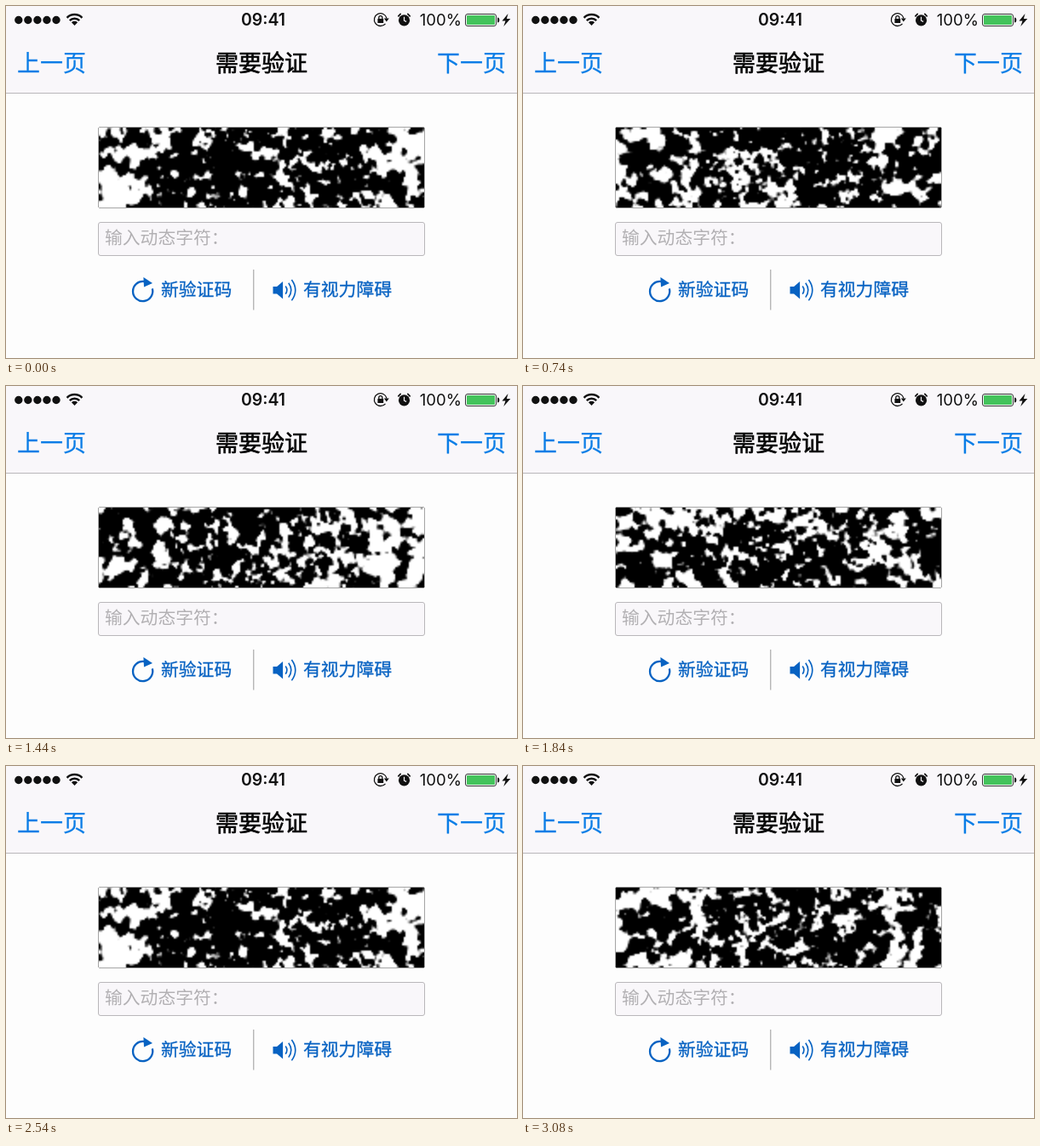
An HTML page with a canvas that plays this animation: 600x414 px, repeating every 3100 ms.

```html
<!DOCTYPE html>
<html lang="zh-CN">
<head>
<meta charset="utf-8">
<style>
  html, body { margin: 0; width: 100%; height: 100%; overflow: hidden; background: #fdfdfd; }
  svg, canvas { position: absolute; display: block; }
  svg { left: 0; top: 0; }
  canvas { left: 109px; top: 143px; width: 382px; height: 94px; }
  text { font-family: "Noto Sans CJK SC", "Noto Sans CJK", "Noto Sans", sans-serif; }
  .status { font-family: Inter, Roboto, sans-serif; fill: #111; }
  .nav { font-size: 27px; fill: #0a7de6; stroke: #0a7de6; stroke-width: 0.25; }
  .title { font-size: 27px; fill: #050505; stroke: #050505; stroke-width: 0.7; }
  .link { font-size: 20.8px; fill: #0762c2; stroke: #0762c2; stroke-width: 0.3; }
  .line { fill: none; stroke: #111; }
  .blue { fill: none; stroke: #0762c2; }
</style>
</head>
<body>
<svg width="600" height="414" viewBox="0 0 600 414">
  <rect width="600" height="102" fill="#f9f7fa"/>
  <rect y="102" width="600" height="1" fill="#b9b7ba"/>

  <path d="M14.8 16.5h45" fill="none" stroke="#111" stroke-width="9.4"
        stroke-linecap="round" stroke-dasharray="0 11.05"/>
  <path d="M80.5 23l-3.6-3.8a5.2 5.2 0 0 1 7.2 0z" fill="#111"/>
  <g class="line" stroke-width="2.5">
    <path d="M71.6 13.8a12.6 12.6 0 0 1 17.8 0"/>
    <path d="M74.8 17.2a8.1 8.1 0 0 1 11.4 0"/>
  </g>
  <text class="status" x="302" y="23" font-size="19.5" font-weight="600" text-anchor="middle">09:41</text>

  <g class="line" stroke-width="1.3">
    <path d="M445.5 20.8A7.4 7.4 0 1 1 447 14.5"/>
    <path d="M437.8 15v-1.4a2 2 0 0 1 4 0V15"/>
  </g>
  <path d="M436.4 15h6.8v5h-6.8zM443.8 14.6h6l-3 4z" fill="#111"/>

  <circle cx="467.5" cy="16.8" r="6.6" fill="#111"/>
  <path class="line" stroke-width="1.7" stroke-linecap="round" d="M460.8 11.8l2.4-2.4M474.2 11.8l-2.4-2.4"/>
  <path d="M467.5 12.8v4.4l2.6 1.2" fill="none" stroke="#f9f7fa" stroke-width="1.2"/>

  <text class="status" x="535" y="23" font-size="18.6" text-anchor="end">100%</text>
  <rect x="539.5" y="9.5" width="36" height="14" rx="2.5" fill="#f9f7fa" stroke="#333"/>
  <rect x="541" y="11" width="33" height="11" rx="1" fill="#43c35b"/>
  <path d="M577 13.5q2.4 0 2.4 3t-2.4 3z" fill="#222"/>
  <path d="M589.5 9l-7 8.6h4l-2.2 6.4 8-9h-4.4z" fill="#111"/>

  <text class="nav" x="13" y="77.3">上一页</text>
  <text class="title" x="300" y="77.3" text-anchor="middle">需要验证</text>
  <text class="nav" x="506" y="77.3">下一页</text>

  <rect x="108.5" y="142.5" width="383" height="95" rx="2" fill="#000" stroke="#a5a5a5"/>
  <rect x="108.5" y="254.5" width="383" height="39" rx="2.5" fill="#f9f7fa" stroke="#b9b7ba"/>
  <text x="116" y="279.8" font-size="20.8" font-weight="300" fill="#b2b0b3">输入动态字符：</text>

  <path class="blue" stroke-width="2.3" d="M162 324A11.6 11.6 0 1 0 171.8 332.4"/>
  <path d="M161.4 319l10.6 7-10 4.4z" fill="#0762c2"/>
  <text class="link" x="182" y="341.3">新验证码</text>
  <rect x="290" y="310" width="1.4" height="47.5" fill="#b6b6b6"/>
  <path d="M313.5 330h4.6l7-6v20.4l-7-6h-4.6z" fill="#0762c2"/>
  <path class="blue" stroke-width="1.6" d="M328.2 329.6q3.4 4.6 0 9.2M331.8 325.8q6 8.4 0 16.8M335.4 322q8.8 12.2 0 24.4"/>
  <text class="link" x="349" y="341.3">有视力障碍</text>
</svg>
<canvas width="191" height="47"></canvas>

<script>
const LOOP = 3100, STEP = 40, CYCLE = 64, GRID = 32;
const canvas = document.querySelector('canvas');
const ctx = canvas.getContext('2d');
const W = canvas.width, H = canvas.height;
const image = ctx.createImageData(W, H);
const pixels = new Uint32Array(image.data.buffer);

function random(seed) {
  return () => {
    seed = (seed * 1664525 + 1013904223) >>> 0;
    return seed / 4294967296;
  };
}

const smooth = u => u * u * (3 - 2 * u);
const lerp = (a, b, u) => a + (b - a) * u;

// Tilted lattice noise; each node swings a whole number of times per cycle
function makeNoise(size, angle, seed, speeds) {
  const rnd = random(seed);
  const c = Math.cos(angle) / size, s = Math.sin(angle) / size;
  const nodes = Array.from({ length: GRID * GRID }, () => ({
    phase: rnd() * 2 * Math.PI,
    speed: (1 + Math.floor(rnd() * speeds)) * (rnd() < 0.5 ? -1 : 1)
  }));
  const values = new Float32Array(nodes.length);
  const node = (x, y) => values[(y & GRID - 1) * GRID + (x & GRID - 1)];
  return {
    advance(turn) {
      nodes.forEach((n, i) => { values[i] = Math.sin(n.phase + n.speed * turn); });
    },
    at(x, y) {
      const px = x * c - y * s, py = x * s + y * c;
      const cx = Math.floor(px), cy = Math.floor(py);
      const u = smooth(px - cx), v = smooth(py - cy);
      return lerp(
        lerp(node(cx, cy), node(cx + 1, cy), u),
        lerp(node(cx, cy + 1), node(cx + 1, cy + 1), u), v);
    }
  };
}

const broad = makeNoise(9, 0.5, 71, 2);
const medium = makeNoise(4.6, 1.1, 409, 4);
const fine = makeNoise(2.3, 0.35, 933, 6);

// The middle stays darker and finer; a few bright patches linger near the ends
const patches = [[7, 37, 8], [40, 6, 5], [160, 16, 7], [166, 35, 7], [186, 7, 7]];
const middle = new Float32Array(W * H), glow = new Float32Array(W * H);
for (let i = 0; i < W * H; i++) {
  const x = i % W, y = Math.floor(i / W);
  middle[i] = Math.exp(-(((x - 97) / 60) ** 4));
  for (const [px, py, r] of patches)
    glow[i] += Math.exp(-((x - px) ** 2 + (y - py) ** 2) / (r * r));
}

// Faint rings around the hidden characters
function ripple(x, y, turn) {
  let sum = 0;
  for (const cx of [78, 133]) {
    const r = Math.hypot(x - cx, y - 24);
    if (r < 13) sum += Math.cos(r * 1.55 - turn * 4) * (1 - r / 13);
  }
  return sum;
}

function draw(step) {
  const turn = step / CYCLE * 2 * Math.PI;
  for (const n of [broad, medium, fine]) n.advance(turn);
  for (let y = 0, i = 0; y < H; y++) {
    for (let x = 0; x < W; x++, i++) {
      const m = middle[i];
      const value = lerp(0.48, 0.28, m) * broad.at(x, y)
        + 0.45 * medium.at(x, y)
        + lerp(0.26, 0.42, m) * fine.at(x, y)
        + 0.42 * glow[i] + 0.16 * ripple(x, y, turn)
        - lerp(0.12, 0.25, m);
      const grey = Math.round(255 * Math.min(1, Math.max(0, 0.5 + value * 7)));
      pixels[i] = 0xff000000 | grey * 0x10101;
    }
  }
  ctx.putImageData(image, 0, 0);
}

let shown = -1;
function tick() {
  const t = performance.now() % LOOP;
  const step = Math.floor((t + STEP / 2) / STEP);
  if (step !== shown) draw(shown = step);
  requestAnimationFrame(tick);
}
tick();
</script>
</body>
</html>
```
